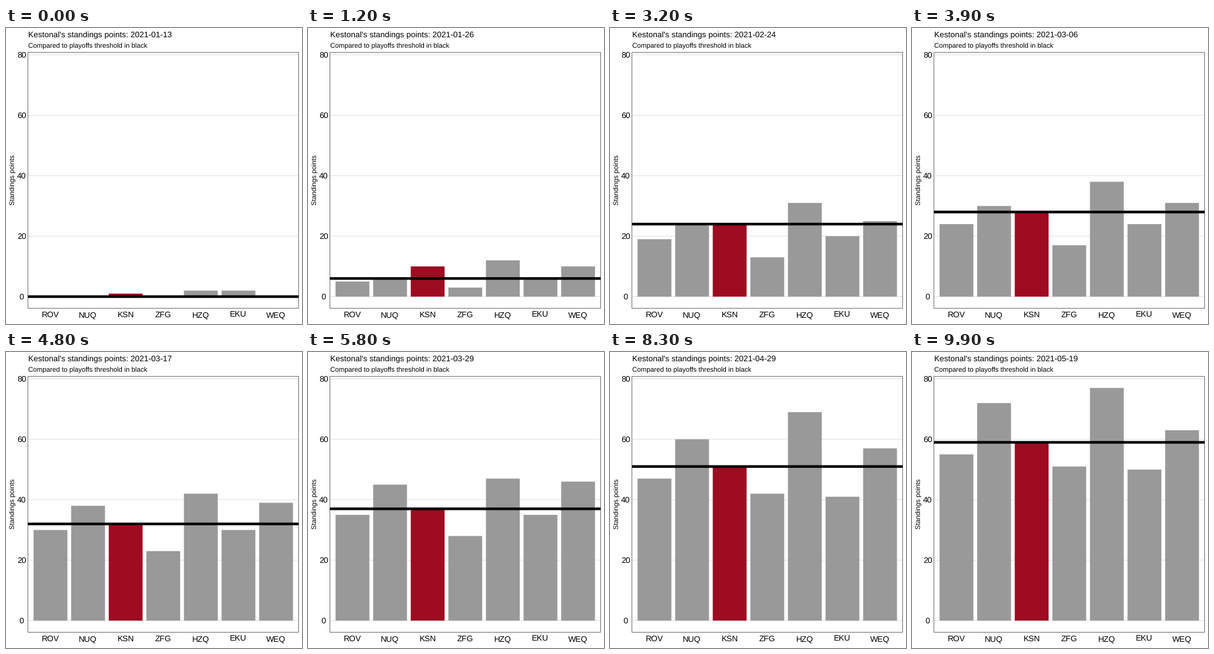
Write a matplotlib script that moves like this. It is 480 by 480 pixels and loops after 10 s.

```python
import numpy as np
import matplotlib.pyplot as plt
from matplotlib.animation import FuncAnimation
from matplotlib.patches import Rectangle

plt.rcParams["font.family"] = "Liberation Sans"
plt.rcParams["text.hinting"] = "none"
plt.rcParams["path.snap"] = False

SIZE, DPI, FRAMES = 480, 100, 100
START = np.datetime64("2021-01-13")
LEFT, RIGHT, TOP, BOTTOM = 35.54, 474.52, 39.5, 454.5
Y0, UNIT = 435.6, 4.9
STEP = (RIGHT - LEFT) / 7.2
HOME = "KSN"

# Key moments of the season: frame, days since the start, points per team.
KEYS = [0, 12, 24, 39, 58, 71, 83, 99]
DAYS = [0, 13, 31, 52, 75, 92, 106, 126]
POINTS = {
    "ROV": [0, 5, 15, 24, 35, 41, 47, 55],
    "NUQ": [0, 6, 18, 30, 45, 52, 60, 72],
    HOME: [1, 10, 20, 28, 37, 45, 51, 59],
    "ZFG": [0, 3, 7, 17, 28, 34, 42, 51],
    "HZQ": [2, 12, 23, 38, 47, 60, 69, 77],
    "EKU": [2, 6, 14, 24, 35, 35, 41, 50],
    "WEQ": [0, 10, 17, 31, 46, 57, 57, 63],
}


def points_at(frame, keys):
    """Climb from key to key in wins of two points."""
    i = min(np.searchsorted(KEYS, frame, side="right"), len(KEYS) - 1)
    a, b = keys[i - 1], keys[i]
    u = (frame - KEYS[i - 1]) / (KEYS[i] - KEYS[i - 1])
    return min(b, a + 2 * int(u * (b - a) / 2 + 0.5))


fig = plt.figure(figsize=(SIZE / DPI, SIZE / DPI), dpi=DPI, facecolor="white")
ax = fig.add_axes([0, 0, 1, 1])
ax.set_xlim(0, SIZE)
ax.set_ylim(SIZE, 0)
ax.axis("off")


def px(size):
    return size * 72 / DPI


def label(x, y, text, size, **kw):
    return ax.text(x, y, text, fontsize=px(size), color="black", **kw)


title = label(35.5, 15, "", 13.1)
label(35.5, 32.6, "Compared to playoffs threshold in black", 11)
label(16.6, 246.4, "Standings points", 11, rotation=90,
      ha="right", va="center")

for value in range(0, 81, 20):
    y = Y0 - value * UNIT
    ax.plot([LEFT, RIGHT], [y - 0.1, y - 0.1], color="#e2e2e2", lw=px(1),
            zorder=1)
    label(25.5, y + 4.5, str(value), 13.2, ha="center")

bars = []
for i, name in enumerate(POINTS):
    x = LEFT + STEP * (i + 0.6)
    color = "#9d0c20" if name == HOME else "#999999"
    bar = Rectangle((x - 0.45 * STEP, Y0), 0.9 * STEP, 0, fc=color, lw=0,
                    snap=True, zorder=2)
    bars.append(ax.add_patch(bar))
    label(x, 469.2, name, 13.2, ha="center")

ax.add_patch(Rectangle((LEFT, TOP), RIGHT - LEFT, BOTTOM - TOP, fill=False,
                       ec="#707070", lw=px(1), zorder=3))
threshold, = ax.plot([], [], color="black", lw=px(4.27), zorder=4,
                     solid_capstyle="butt")


def update(frame):
    day = round(float(np.interp(frame, KEYS, DAYS)))
    points = [points_at(frame, keys) for keys in POINTS.values()]
    for bar, value in zip(bars, points):
        bar.set_height(-value * UNIT)
    # Four teams reach the playoffs.
    y = Y0 - sorted(points)[-4] * UNIT
    threshold.set_data([LEFT, RIGHT], [y, y])
    title.set_text(f"Kestonal's standings points: {START + day}")
    return [*bars, threshold, title]


anim = FuncAnimation(fig, update, frames=FRAMES, interval=100, repeat=True,
                     repeat_delay=0, blit=False)
plt.show()
```
